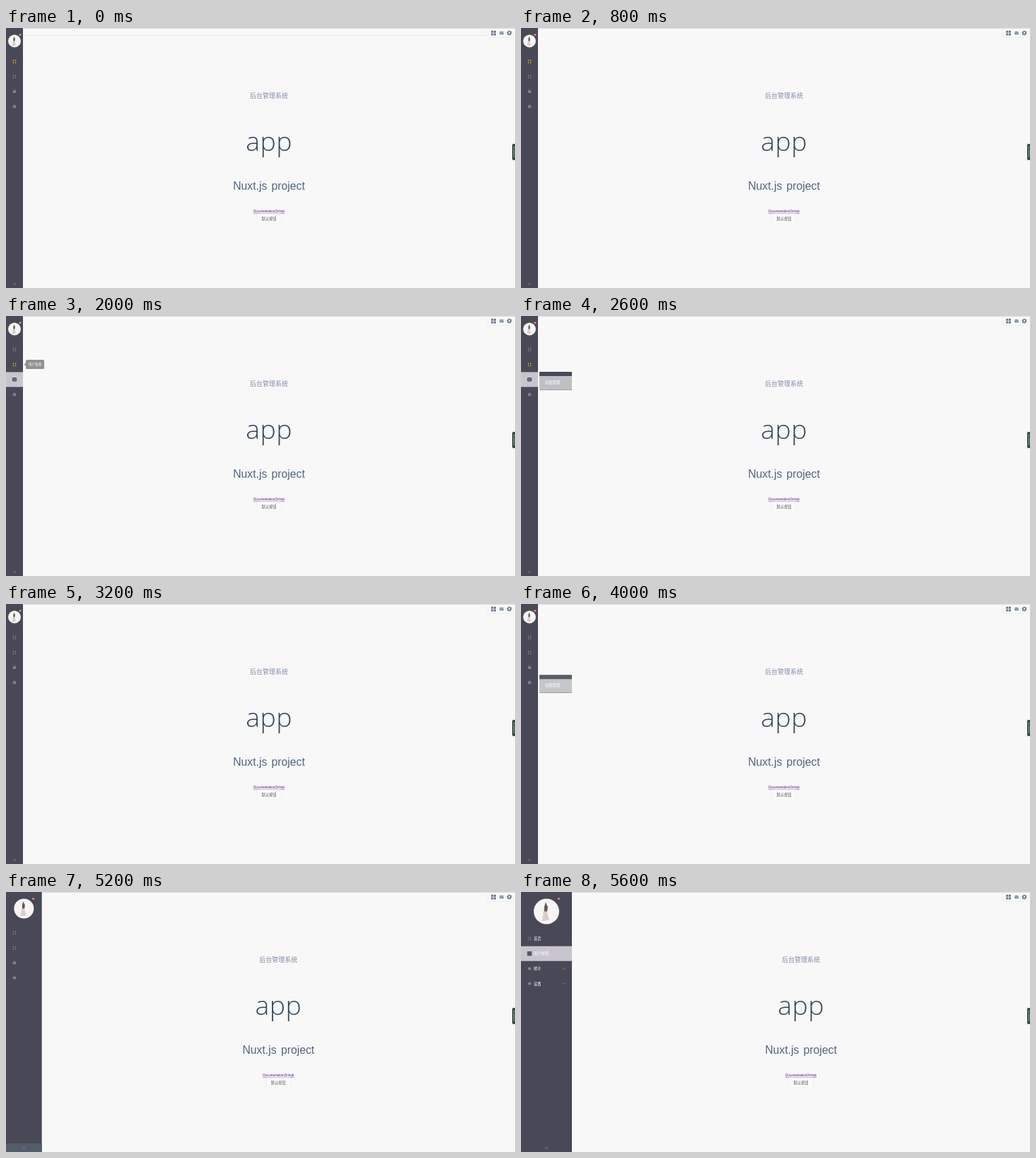
An HTML page for the animation above (5.8 s loop, 720 by 368 pixels).

```html
<!DOCTYPE html>
<html lang="zh">
<head>
<meta charset="utf-8">
<style>
html, body { margin: 0; width: 100%; height: 100%; overflow: hidden; background: #f8f8f8; }
svg { display: block; width: 720px; height: 368px; }
text { font-family: "Noto Sans CJK SC", "Noto Sans CJK", sans-serif; font-size: 5.25px; }
.mid { text-anchor: middle; }
.sans { font-family: "Liberation Sans", Arial, sans-serif; }
</style>
</head>
<body>
<svg viewBox="0 0 720 368">
  <defs>
    <g id="grid"><path d="M-2.7-2.7h2.4v2.4h-2.4zM.3-2.7h2.4v2.4H.3zM-2.7.3h2.4v2.4h-2.4zM.3.3h2.4v2.4H.3z"/></g>
    <g id="mail">
      <rect x="-2.7" y="-2.2" width="5.4" height="4.4" rx=".5"/>
      <path class="flap" d="M-2.4-1.2 0 .5 2.4-1.2" fill="none" stroke-width=".6"/>
    </g>
    <path id="more" d="M-2.2-1.8-.4 0-2.2 1.8M.2-1.8 2 0 .2 1.8" fill="none" stroke="#8191a8" stroke-width=".6"/>
  </defs>
  <rect width="720" height="368" fill="#f8f8f8"/>
  <path d="M0 .5H720" stroke="#d9dde2"/>
  <path id="bar" d="M24 10.5H682" stroke="#e9eaed"/>
  <path d="M681.5 1V13H720" fill="none" stroke="#eeeff1"/>
  <g fill="#6c7c92" stroke="#f8f8f8">
    <use href="#grid" transform="translate(689.6 7) scale(1.25)" stroke="none"/>
    <use href="#mail" transform="translate(701 7) scale(1.25)"/>
    <g transform="translate(712 7)">
      <circle r="2" fill="none" stroke="#6c7c92" stroke-width="1.7"/>
      <circle r="3" fill="none" stroke="#6c7c92" stroke-width="1.1" stroke-dasharray="1.57"/>
    </g>
  </g>
  <g id="page" class="mid">
    <text y="99.2" style="font-size:9px;font-weight:500" fill="#7f8ba3">后台管理系统</text>
    <text y="174" style="font:300 37.5px 'Open Sans',sans-serif;letter-spacing:.4px" fill="#35495e">app</text>
    <text class="sans" y="229" style="font-size:15.75px;word-spacing:1.9px" fill="#526488">Nuxt.js project</text>
    <text class="sans" y="261.3" style="font-size:4.5px;text-decoration:underline" fill="#551a8b">DocumentationZinhab</text>
    <rect x="-17.5" y="262.8" width="35" height="14.6" rx="1.5" fill="#fafafa" stroke="#e6e7ec" stroke-width=".5"/>
    <text y="272" fill="#55585e">默认按钮</text>
  </g>
  <rect x="716" y="164" width="6" height="23" rx="2" fill="#3f4850"/>
  <path d="M718.4 172v11" stroke="#58c070"/>
  <path d="M718.4 168v3" stroke="#c8a85a"/>
  <rect id="side" height="368" fill="#494857"/>
  <g id="face">
    <circle r="9" fill="#f7f5f3"/>
    <path d="M-.6-6 1-3 .6 1 2 6-3 7-2-1z" fill="#d8d0c8"/>
    <path d="M-.6-6.5 1-3 .4 0-1.4 0-1.6-3z" fill="#5d5a5c"/>
  </g>
  <circle id="dot" cy="9.5" r="1.6" fill="#e08585"/>
  <g id="menu"></g>
  <rect id="foot" y="356" height="12" fill="#535c6a"/>
  <use id="toggle" href="#more"/>
  <g id="tip">
    <path d="M25.5 68.6 28 66.4V70.8z" fill="#2b2b34"/>
    <rect x="28" y="62" width="26" height="13" rx="1.5" fill="#2b2b34"/>
    <text class="mid" x="41" y="70.2" style="font-size:4.5px" fill="#fff">用户管理</text>
  </g>
  <g id="pops"></g>
</svg>
<script>
const $ = id => document.getElementById(id);
const set = (el, attrs) => { for (const k in attrs) el.setAttribute(k, attrs[k]); };
const ramp = (t, a, b) => Math.min(1, Math.max(0, (t - a) / (b - a)));
const pulse = (t, a, b, c, d) => ramp(t, a, b) * (1 - ramp(t, c, d));

const names = ['首页', '用户管理', '统计', '设置'];
$('menu').innerHTML = names.map((name, i) => `<g>
  <rect y="-10.5" height="21" fill="#c9c5ce"/>
  <use href="#${i < 2 ? 'grid' : 'mail'}" x="12" stroke="#494857"/>
  <g class="label"><text x="18" y="1.9" fill="#fff">${name}</text>
  ${i < 2 ? '' : '<path d="M58-1 60.3 1 62.6-1" fill="none" stroke="#8d97a8" stroke-width=".6"/>'}</g></g>`).join('');
const rows = [...$('menu').children];

$('pops').innerHTML = [79, 100.3].map(y => `<g transform="translate(26 ${y})">
  <rect width="46" height="25.5" rx="1" fill="#494857"/>
  <rect y="6" width="46" height="19" fill="#bec1c4"/>
  <text x="8" y="17.2" fill="#fff">权限管理</text></g>`).join('');
const pops = [...$('pops').children];

function draw(t) {
  const p = 1 - (1 - ramp(t, 5000, 5600)) ** 2;
  const w = 24 + 48 * p;
  const active = t < 1600 ? 0 : t < 2800 ? 1 : -1;
  const hover = [
    0,
    pulse(t, 800, 1200, 1600, 2000) + ramp(t, 5200, 5600),
    pulse(t, 1600, 2000, 2600, 3000),
    pulse(t, 3200, 3600, 3600, 4000)
  ];
  set($('bar'), { opacity: t < 400 ? 1 : 0 });
  set($('page'), { transform: `translate(${(720 + w) / 2} 0)` });
  set($('side'), { width: w });
  set($('face'), { transform: `translate(${w / 2} ${18.5 + 9 * p}) scale(${1 + p})` });
  set($('dot'), { cx: 20 + 33.5 * p });
  rows.forEach((row, i) => {
    const [back, icon, label] = row.children;
    set(row, { transform: `translate(0 ${47.5 + 18.5 * p + 21.2 * i})` });
    set(back, { width: w, opacity: hover[i] });
    set(icon, { fill: i === active ? '#fac02e' : hover[i] > .5 ? '#7d7d88' : '#8e96a4' });
    set(label, { opacity: p > .8 ? 1 : 0 });
  });
  set($('foot'), { width: w, opacity: pulse(t, 4600, 4800, 5200, 5600) });
  set($('toggle'), { transform: `translate(${w / 2} 362) scale(${p > .8 ? -1 : 1} 1)` });
  set($('tip'), { opacity: pulse(t, 800, 1200, 1800, 2200) });
  set(pops[0], { opacity: pulse(t, 2000, 2400, 2800, 3200) });
  set(pops[1], { opacity: ramp(t, 3200, 3600) * (1 - ramp(t, 3800, 4400) ** 2) });
}

const start = performance.now();
function frame(now) {
  const t = Math.max(0, now - start) % 5800;
  draw(Math.floor(t / 200) * 200);
  requestAnimationFrame(frame);
}
draw(0);
requestAnimationFrame(frame);
</script>
</body>
</html>
```
